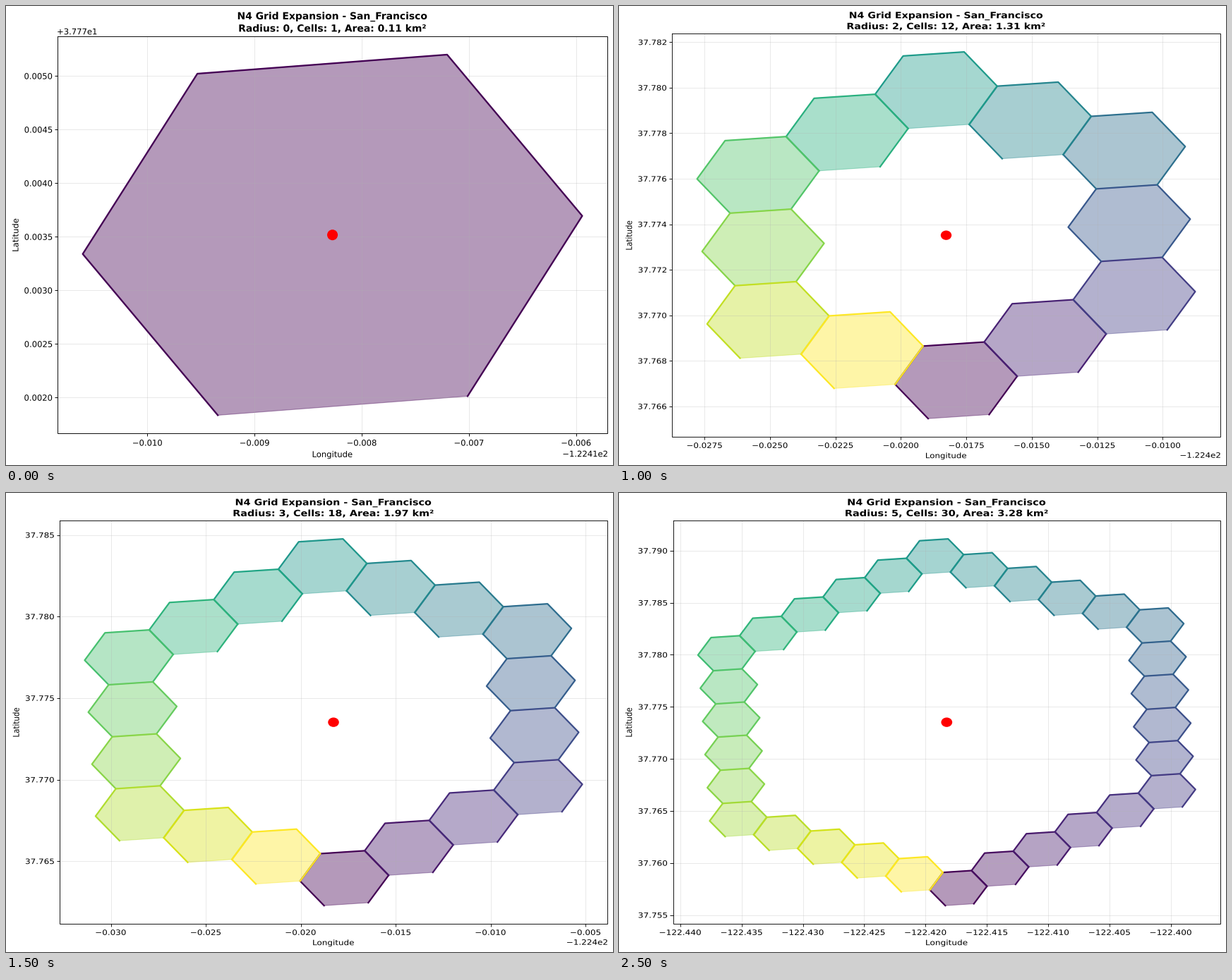
These frames come from a looping animation (860 by 651 pixels, 3 s). A matplotlib script:

```python
import math

import matplotlib.pyplot as plt
import numpy as np
from matplotlib.animation import FuncAnimation
from matplotlib.patches import Ellipse, PathPatch
from matplotlib.textpath import TextPath
from matplotlib.transforms import Affine2D

W, H = 860, 651
PT = 1000 / 864            # pixels per point before the picture is scaled
LW = 5 / 6                 # line width factor for the figure's dpi
CENTER = np.array([-122.418274, 37.773517])
CELL_KM2 = 0.1094

# Two spanning vertices of a cell, in degrees from its centre
A = np.array([-191.5, 228.5]) / 151900
C = np.array([354.0, 27.0]) / 151900
OUTLINE = np.array([-A, C, A + C, A, -C, -A - C])
SPOKES = [-2 * A - C, C - A, A + 2 * C, 2 * A + C, A - C, -A - 2 * C]

# Plot box (left, right, top, bottom), then step, decimals and offset per axis
VIEWS = [
    ((73.3, 851.8, 43.4, 606.0), (0.001, 3, -122.41), (0.0005, 4, 37.77)),
    ((73.2, 845.6, 39.1, 611.2), (0.002, 3, -122.4), (0.002, 3, 0)),
    ((75.3, 851.7, 39.1, 611.2), (0.0025, 4, -122.4), (0.002, 3, 0)),
    ((76.2, 851.8, 39.1, 611.2), (0.005, 3, -122.4), (0.005, 3, 0)),
    ((74.1, 825.0, 39.1, 611.2), (0.005, 3, 0), (0.005, 3, 0)),
    ((76.6, 852.0, 39.1, 611.2), (0.005, 3, 0), (0.005, 3, 0)),
]
OFFSET_NOTES = {-122.41: "−1.2241e2", -122.4: "−1.224e2", 37.77: "+3.777e1"}

fig = plt.figure(figsize=(W / 100, H / 100), dpi=100, facecolor="white")
ax = fig.add_axes([0, 0, 1, 1])


def ring(radius):
    """Cell centres around the middle, counter-clockwise from the bottom."""
    if radius == 0:
        return [CENTER]
    return [
        CENTER + SPOKES[k] * (radius - j) + SPOKES[(k + 1) % 6] * j
        for k in range(6)
        for j in range(radius)
    ]


def ticks(low, high, step, decimals, offset):
    first = math.ceil((low - offset) / step)
    last = math.floor((high - offset) / step)
    for n in range(first, last + 1):
        yield offset + n * step, f"{n * step:.{decimals}f}".replace("-", "−")


def write(x, y, text, scale, points=10, align=0.5, weight="normal", angle=0):
    """Put text with its baseline at (x, y), under the picture's scale."""
    path = TextPath((0, 0), text, size=points * PT,
                    prop={"family": "DejaVu Sans", "weight": weight})
    box = path.get_extents()
    place = (Affine2D().translate(-box.x0 - align * box.width, 0)
             .rotate_deg(angle).scale(scale[0], -scale[1]).translate(x, y))
    ax.add_patch(PathPatch(path.transformed(place), fc="black", lw=0, zorder=4))


def draw(radius):
    ax.clear()
    ax.set(xlim=(0, W), ylim=(H, 0))
    ax.axis("off")

    (left, right, top, bottom), x_axis, y_axis = VIEWS[radius]
    cells = [c + OUTLINE for c in ring(radius)]
    points = np.concatenate(cells)
    low, high = points.min(axis=0), points.max(axis=0)
    margin = 0.05 * (high - low)
    low, high = low - margin, high + margin
    span = high - low

    # The equal-aspect plot is fitted to its area, then stretched to the stage
    unit = min(778.5 / span[0], 644 / span[1])
    sx = (right - left) / (span[0] * unit)
    sy = (bottom - top) / (span[1] * unit)
    scale = (sx, sy)
    thick = LW * math.sqrt(sx * sy)

    def to_px(p):
        f = (np.asarray(p) - low) / span
        return np.stack([left + f[..., 0] * (right - left),
                         bottom - f[..., 1] * (bottom - top)], axis=-1)

    colors = plt.cm.viridis(np.linspace(0, 1, len(cells)))
    for cell, color in zip(cells, colors):
        x, y = to_px(cell).T
        ax.fill(x, y, color=color, alpha=0.4, lw=thick, zorder=1)
        ax.plot(x, y, color=color, lw=2 * thick, zorder=2)

    dot = 13 * PT
    ax.add_patch(Ellipse(to_px(CENTER), dot * sx, dot * sy,
                         fc="red", lw=0, zorder=3))

    grid = dict(color="#b0b0b0", alpha=0.3, lw=0.8 * thick, zorder=1.5)
    frame = dict(color="black", lw=0.8 * thick, zorder=2.5)
    tick, pad, em = 3.5 * PT, 7 * PT, 10 * PT

    for value, label in ticks(low[0], high[0], *x_axis):
        x = to_px((value, low[1]))[0]
        ax.plot([x, x], [top, bottom], **grid)
        ax.plot([x, x], [bottom, bottom + tick * sy],
                solid_capstyle="butt", **frame)
        write(x, bottom + (pad + 0.82 * em) * sy, label, scale)

    for value, label in ticks(low[1], high[1], *y_axis):
        y = to_px((low[0], value))[1]
        ax.plot([left, right], [y, y], **grid)
        ax.plot([left - tick * sx, left], [y, y],
                solid_capstyle="butt", **frame)
        write(left - pad * sx, y + 0.38 * em * sy, label, scale, align=1)

    ax.plot([left, right, right, left, left], [top, top, bottom, bottom, top],
            solid_joinstyle="miter", **frame)

    middle = (left + right) / 2
    write(middle, bottom + 33.8 * sy, "Longitude", scale)
    write(left - 55.8 * sx, (top + bottom) / 2, "Latitude", scale, angle=90)
    if x_axis[2]:
        write(right, bottom + 33.2 * sy, OFFSET_NOTES[x_axis[2]], scale, align=1)
    if y_axis[2]:
        write(left, top - 3.1 * sy, OFFSET_NOTES[y_axis[2]], scale, align=0)

    count = len(cells)
    title = ["N4 Grid Expansion - San_Francisco",
             f"Radius: {radius}, Cells: {count}, "
             f"Area: {count * CELL_KM2:.2f} km²"]
    for line, rise in zip(title, (24.5, 7)):
        write(middle, top - rise * sy, line, scale, points=12, weight="bold")
    return []


anim = FuncAnimation(fig, draw, frames=len(VIEWS), interval=500,
                     init_func=lambda: [], repeat=True, repeat_delay=0)
plt.show()
```
